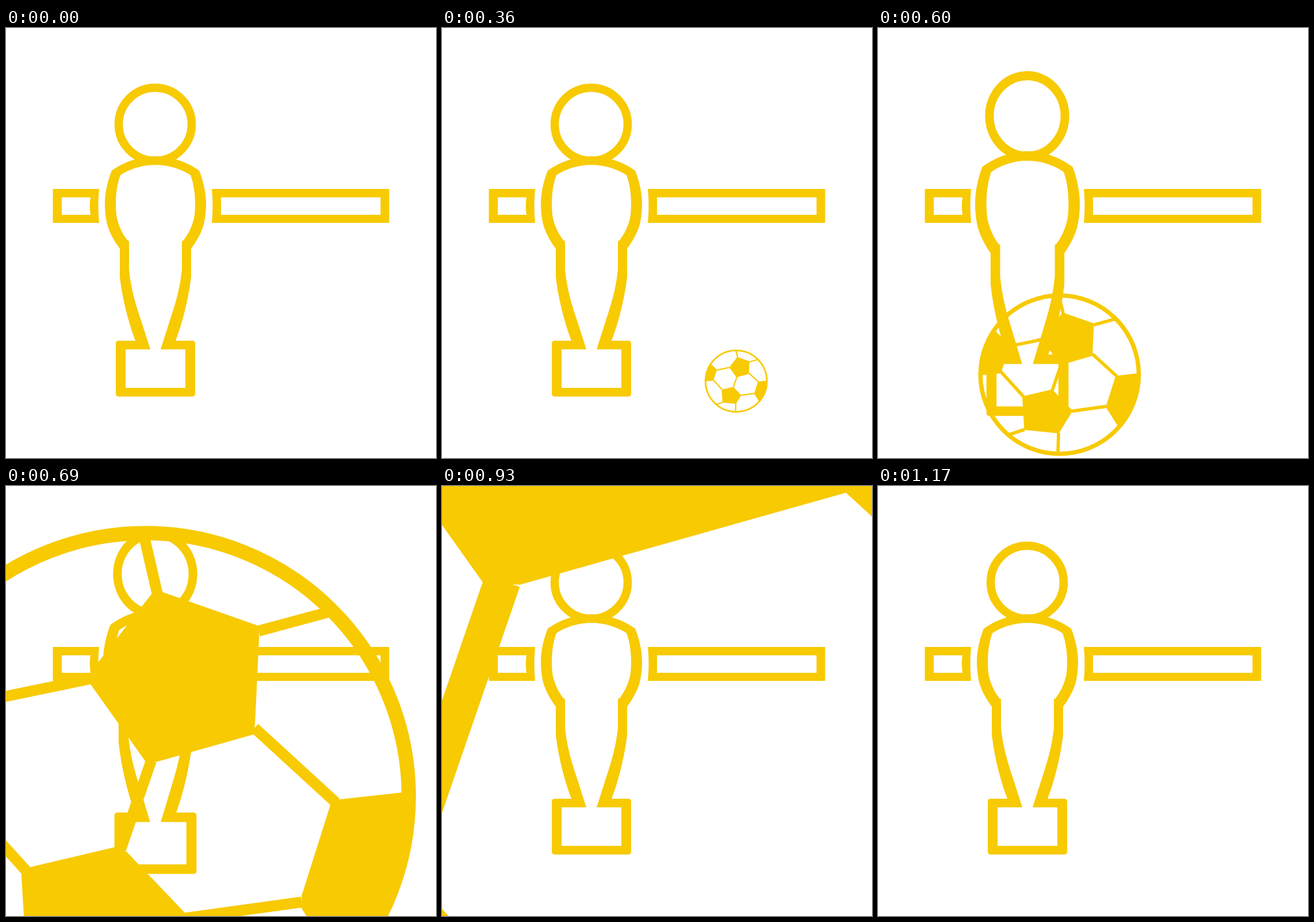
Recreate the animation shown at these times as an HTML page. Size 748 by 748 pixels, loop 1260 ms.

```html
<!DOCTYPE html>
<html lang="en">
<head>
<meta charset="utf-8">
<title>Table football</title>
<style>
  html, body { margin: 0; height: 100%; overflow: hidden; background: #fff; }
  svg { display: block; width: 100vw; height: 100vh; }
</style>
</head>
<body>
<svg viewBox="0 0 748 748" fill="#f7ca02">
  <g fill-rule="evenodd">
    <path d="M81.5 280H162Q159 309 162 339H81.5zM97 294.5V325H147Q144.500 309 147 294.500z"/>
    <path d="M358 280H666.500V339H358Q361 309 358 280zM374 294.500V325H651.500V294.500z"/>
  </g>
  <g id="player">
    <circle cx="259.5" cy="167.5" r="63.5" fill="none" stroke="#f7ca02" stroke-width="14.5"/>
    <path id="half" d="M261 223C228 224 204 234 184 248C176 268 172 288 172 306C172 320 174 335 177 345
      C182 360 190 373 198 384V433C202 468 212 510 225 544H196Q191 544 191 549V636Q191 641 196 641
      H261V626H208V559H251L237 515C228 487 218 460 214 420V371L211 369C204 360 198 349 194 335
      C192 328 191 318 191 306C191 290 193 272 199 256C214 246 236 238 261 238z"/>
    <use href="#half" transform="matrix(-1 0 0 1 520 0)"/>
  </g>
  <g id="ball">
    <g fill="none" stroke="#f7ca02" stroke-width="19">
      <circle r="458.5" stroke-width="25"/>
      <path d="M-4 -460L21 -352M197 -288L330 -324M190 -119L332 11M10 -62L-43 92M-95 -205L-292 -164
        M68 212L272 184M-208 129L-343 -20M-6 338L-10 460M-203 318L-295 348"/>
    </g>
    <path d="M12 -354L29 -356L197 -297L198 -279L191 -130L189 -108L19 -60L0 -61L-96 -196L-93 -220z"/>
    <path d="M-52 88L-33 96L68 202V222L-4 340H-12L-205 320L-216 135L-201 123z"/>
    <path d="M339 5L448 -7A460 460 0 0 1 346 312L272 195V173L322 15z"/>
    <path d="M-339 -12L-350 -6L-455 4A460 460 0 0 1 -385 -265L-290 -172L-291 -155z"/>
  </g>
</svg>
<script>
const LOOP = 1260, STEP = 30, ROD_Y = 309, CENTRE_X = 260;
const player = document.getElementById('player');
const ball = document.getElementById('ball');

// Keys are [time, value] pairs joined by straight lines.
const ballX = [[0, 805.5], [690, 242.5], [810, 155], [1170, -95]];
const ballY = [[0, 607.6], [578, 618.3], [690, 540], [810, 458.5], [1170, 202]];
const stretch = [[390, 1], [480, 0.816], [600, 1.102], [840, 1.102], [930, 1]];

function at(keys, t) {
  const i = keys.findIndex(key => key[0] > t);
  if (i < 0) return keys[keys.length - 1][1];
  if (i === 0) return keys[0][1];
  const [t0, a] = keys[i - 1], [t1, b] = keys[i];
  return a + (b - a) * (t - t0) / (t1 - t0);
}

// Constant size, a short ease-in around the kick, then linear growth.
function ballScale(t) {
  const u = (t - 600) / STEP, ease = 2.5;
  const growth = u < -ease ? 0 : u > ease ? u : (u + ease) ** 2 / (4 * ease);
  return 0.1165 + 0.2942 * growth;
}

function draw(now) {
  const t = Math.floor(now % LOOP / STEP) * STEP;
  const sy = at(stretch, t), sx = 1 + 0.34 * (sy - 1);
  player.setAttribute('transform',
    `translate(${CENTRE_X} ${ROD_Y}) scale(${sx} ${sy}) translate(${-CENTRE_X} ${-ROD_Y})`);
  ball.setAttribute('transform',
    `translate(${at(ballX, t)} ${at(ballY, t)}) scale(${ballScale(t)})`);
  ball.setAttribute('visibility', t > 0 && t < 1170 ? 'visible' : 'hidden');
}

const start = performance.now();
function tick() {
  draw(performance.now() - start);
  requestAnimationFrame(tick);
}
tick();
</script>
</body>
</html>
```
